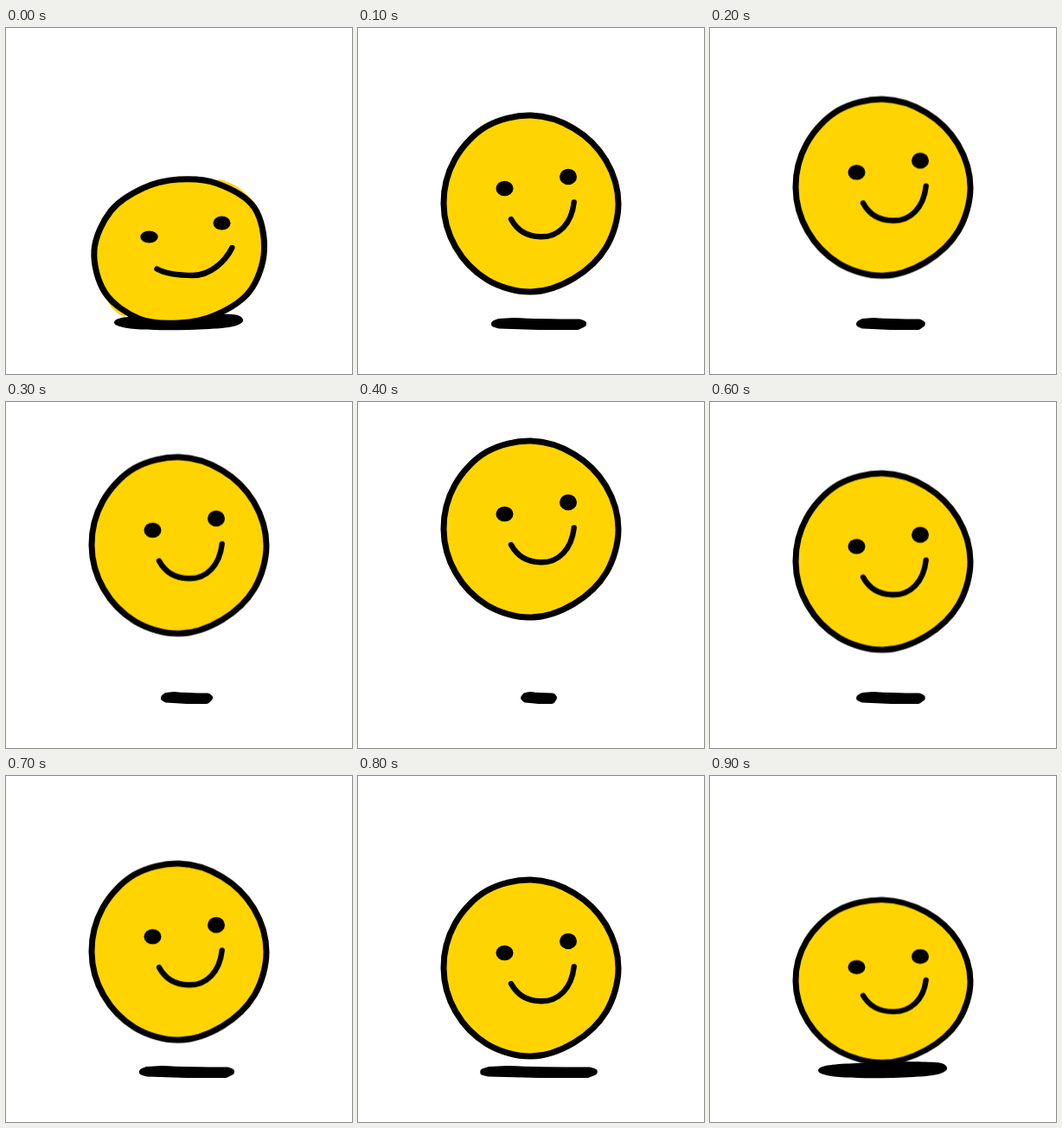
Animation, 400 px wide and 400 px high, one loop 1 s. Source, as an HTML page:

```html
<!DOCTYPE html>
<html lang="en">
<head>
<meta charset="utf-8">
<title>Bouncing smiley</title>
<style>
html, body { margin: 0; width: 100%; height: 100%; overflow: hidden; background: #fff; }
svg { display: block; width: 400px; height: 400px; }
.yellow { fill: #ffd400; }
.line { stroke: #000; stroke-width: 7; stroke-linejoin: round; stroke-linecap: round; }
.mouth { fill: none; stroke-width: 6.4; }

#ball, #bar, #flat, #ground { animation: 1s step-end infinite; transform-origin: 0 0; }
#ball { animation-name: bounce; }
#bar { animation-name: shrink; }
#flat { animation-name: squash; }
#ground { animation-name: land; }

/* Three steps up, four down, then a squeeze on landing */
@keyframes bounce {
  0% { visibility: hidden; transform: none; }
  10% { visibility: visible; transform: none; animation-timing-function: steps(3); }
  40% { visibility: visible; transform: translateY(-56px); animation-timing-function: steps(4); }
  80% { visibility: visible; transform: translateY(19px); }
  90%, 100% { visibility: visible; transform: translateY(50px) scaleY(.922); }
}
@keyframes shrink {
  0%, 90%, 100% { visibility: hidden; transform: none; }
  10%, 70% { visibility: visible; transform: none; }
  20%, 60% { visibility: visible; transform: scaleX(.7); }
  30%, 50% { visibility: visible; transform: scaleX(.51); }
  40% { visibility: visible; transform: scaleX(.33); }
  80% { visibility: visible; transform: scaleX(1.25); }
}
@keyframes squash {
  0% { visibility: visible; }
  10%, 100% { visibility: hidden; }
}
@keyframes land {
  0%, 90%, 100% { visibility: visible; }
  10% { visibility: hidden; }
}
</style>
</head>
<body>
<svg viewBox="0 0 400 400">
  <path id="ground" d="M125 340C127 334 145 333 170 332C200 330 240 330 260 331C270 331 275 335 274 339C270 346 250 347 235 348C200 350 150 350 135 346C128 344 125 343 125 340Z"/>

  <g transform="translate(209 342)">
    <path id="bar" d="M-51 0L-46 -2L-29 -3Q0 -1.500 47 -1.500L51 0L45 3H0L-46 1.500Z"
      stroke="#000" stroke-width="8" stroke-linejoin="round" vector-effect="non-scaling-stroke"/>
  </g>

  <g id="ball">
    <path id="round" class="yellow line"/>
    <ellipse cx="169.500" cy="185.500" rx="10" ry="8.800"/>
    <ellipse cx="243" cy="172" rx="10" ry="9.200"/>
    <path class="line mouth" d="M177 221C184 234 195 241 211 241.300C232 242 247 226 249.700 201.500"/>
  </g>

  <g id="flat">
    <path class="yellow" d="M245 175Q268 178 288 203L250 200ZM117 316Q125 329 137 334L150 320Z"/>
    <path id="low" class="yellow line"/>
    <ellipse cx="165.500" cy="241.500" rx="10.200" ry="7"/>
    <ellipse cx="249.500" cy="225.500" rx="10" ry="8"/>
    <path class="line mouth" d="M174.500 278.500C184 284 199 286 216 286C237 286 254 269 261.300 254"/>
  </g>
</svg>
<script>
// Wobbly closed curve: radii at equal angles, clockwise from the top
function blob(id, cx, cy, radii) {
  const n = radii.length;
  const at = i => {
    const a = 2 * Math.PI * i / n, r = radii[(i + n) % n];
    return [cx + r * Math.sin(a), cy - r * Math.cos(a)];
  };
  let d = 'M' + at(0);
  for (let i = 0; i < n; i++) {
    const [a, b, c, e] = [at(i - 1), at(i), at(i + 1), at(i + 2)];
    const c1 = b.map((v, k) => v + (c[k] - a[k]) / 6);
    const c2 = c.map((v, k) => v - (e[k] - b[k]) / 6);
    d += 'C' + [c1, c2, c].join(' ');
  }
  document.getElementById(id).setAttribute('d', d + 'Z');
}

blob('round', 200, 203, [102, 100, 100, 101, 100.5, 99.5, 102, 101.5, 100.7, 101, 101.8, 103]);
blob('low', 200, 257, [82, 89, 100, 98.5, 94.5, 86, 84, 91.5, 98.5, 98, 91, 83]);
</script>
</body>
</html>
```
